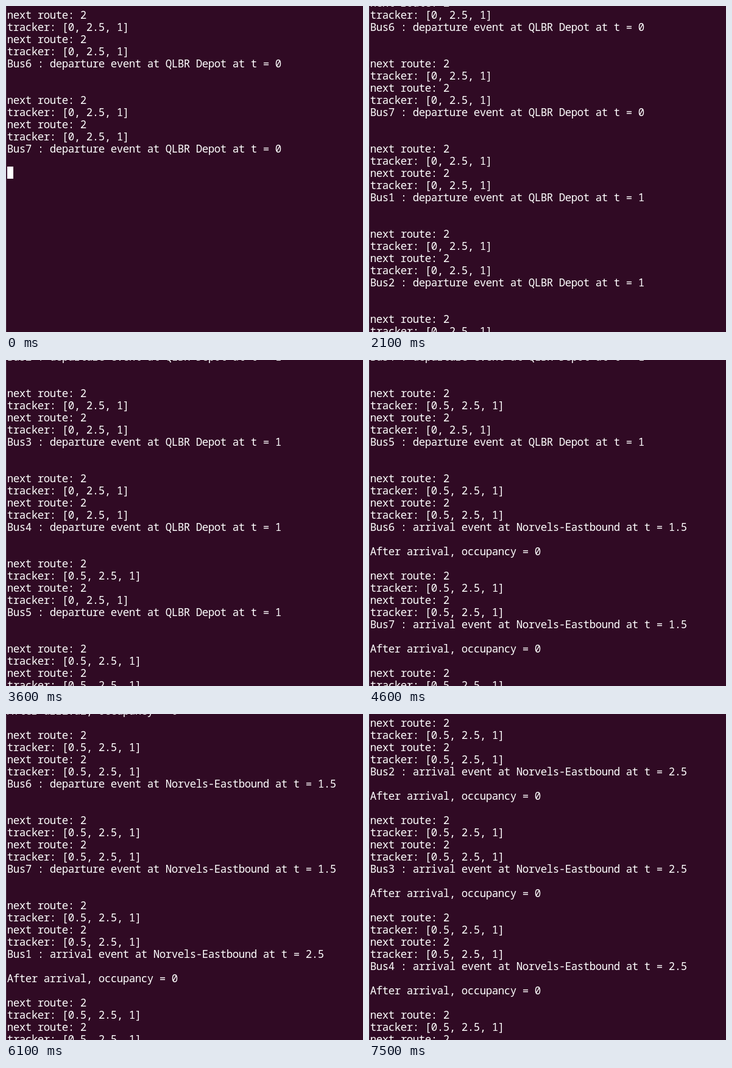
An HTML page with a canvas that plays this animation: 586 px wide and 536 px high, repeating every 8 s.

```html
<!DOCTYPE html>
<html lang="en">
<head>
<meta charset="utf-8">
<title>Bus simulation log</title>
<style>
  html, body { margin: 0; width: 100%; height: 100%; overflow: hidden; background: #300a24; }
  canvas { display: block; }
</style>
</head>
<body>
<canvas id="stage" width="586" height="536"></canvas>
<script>
const ctx = document.getElementById('stage').getContext('2d');
const W = 586, H = 536, LOOP = 8000;
const CELL = 10, ROW = 20, LEFT = 2, TOP = 4, BASELINE = 17;
const ROWS = 27;
const DEPOT = 'QLBR Depot', STOP = 'Norvels-Eastbound';

const lines = [];

function addEvent(bus, kind, place, t, first, second) {
  for (const n of [first, second]) {
    lines.push('next route: 2', `tracker: [${n}, 2.5, 1]`);
  }
  lines.push(`Bus${bus} : ${kind} event at ${place} at t = ${t}`, '');
  if (kind === 'arrival') lines.push('After arrival, occupancy = 0');
  lines.push('');
}

const depart = (bus, place, t, first, second = first) =>
  addEvent(bus, 'departure', place, t, first, second);
const arrive = (bus, t) => addEvent(bus, 'arrival', STOP, t, 0.5, 0.5);

for (const bus of [6, 7]) depart(bus, DEPOT, 0, 0);
for (const bus of [1, 2, 3, 4]) depart(bus, DEPOT, 1, 0);
depart(5, DEPOT, 1, 0.5, 0);
for (const bus of [6, 7]) arrive(bus, 1.5);
for (const bus of [6, 7]) depart(bus, STOP, 1.5, 0.5);
for (const bus of [1, 2, 3, 4, 5]) arrive(bus, 2.5);

// Each step: start time in ms, line the cursor has reached
const steps = [
  [0, 13], [500, 20], [1100, 27], [2100, 34], [2600, 41],
  [3100, 49], [3600, 57], [4100, 65], [4600, 71], [5100, 78],
  [5600, 87], [6100, 95], [6600, 103], [7100, 111], [7500, 118]
];
const LAST_ROW = 31; // the window reaches below the visible stage

ctx.font = '17.5px "Noto Sans Mono", "DejaVu Sans Mono", monospace';
const gap = CELL - ctx.measureText('0').width;
ctx.letterSpacing = gap + 'px';

function draw(time) {
  const cursor = steps.filter(([start]) => start <= time).pop()[1];
  const top = Math.max(0, cursor - LAST_ROW);

  ctx.fillStyle = '#300a24';
  ctx.fillRect(0, 0, W, H);
  ctx.fillStyle = '#4e3048';
  ctx.fillRect(0, 0, 1, H);

  ctx.fillStyle = '#fff';
  for (let row = -1; row < ROWS; row++) {
    const i = top + row;
    if (i < cursor && lines[i]) {
      ctx.fillText(lines[i], LEFT + gap / 2, TOP + row * ROW + BASELINE);
    }
  }
  ctx.fillRect(LEFT, TOP + (cursor - top) * ROW, CELL, ROW);
}

const begin = performance.now();
function tick() {
  draw((performance.now() - begin) % LOOP);
  requestAnimationFrame(tick);
}
tick();
</script>
</body>
</html>
```
